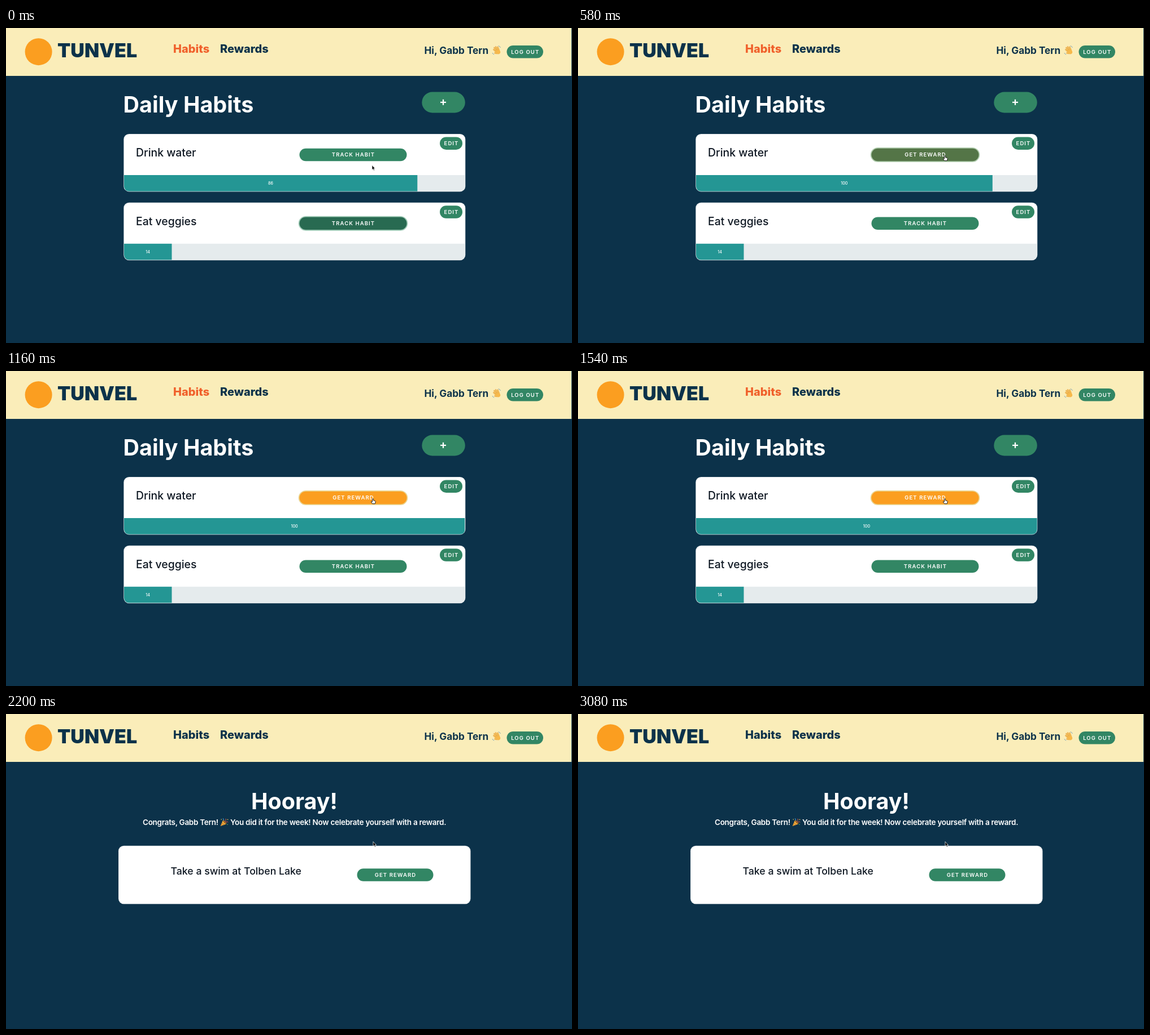
Animation, 1002 px wide and 559 px high, one loop 3100 ms. Source, as an HTML page:

```html
<!DOCTYPE html>
<html lang="en">
<head>
<meta charset="utf-8">
<title>Habit tracker</title>
<style>
  html, body { margin: 0; width: 100%; height: 100%; overflow: hidden; background: #0c324a; }
  svg { display: block; width: 100vw; height: 100vh; }
  text { font-family: Inter, "Open Sans", sans-serif; font-weight: 600; fill: #fff; white-space: pre; }
  .brand { font-size: 34px; font-weight: 900; fill: #0c324a; }
  .nav { font-size: 20px; font-weight: 800; fill: #0c324a; }
  .hello { font-size: 17.2px; font-weight: 700; fill: #0c324a; }
  .title { font-size: 39.5px; font-weight: 700; }
  .habit { font-size: 19.4px; font-weight: 550; fill: #0f1823; }
  .reward { font-size: 17.7px; font-weight: 550; fill: #0f1823; }
  .note { font-size: 13.5px; letter-spacing: -.28px; }
  .label { font-size: 9.5px; letter-spacing: 1.1px; text-anchor: middle; }
  .count { font-size: 7.2px; font-weight: 500; text-anchor: middle; }
  .middle { text-anchor: middle; }
</style>
</head>
<body>
<svg id="stage" viewBox="0 0 1002 559" preserveAspectRatio="none"></svg>
<script>
const LOOP = 3100;
const GREEN = [50, 134, 100], DARK = [40, 106, 81], ORANGE = [251, 158, 32];
const GREEN_RING = [164, 205, 186], GOLD_RING = [235, 213, 145], WHITE = [255, 255, 255];
const BAR_LEFT = 209, BAR_WIDTH = 603.8;
const rgb = c => `rgb(${c.map(Math.round)})`;

const text = (cls, x, y, value, id = '') =>
  `<text class="${cls}" x="${x}" y="${y}" id="${id}">${value}</text>`;

const button = (x, y, w, h, label, id = '') => `
  <rect id="${id}Box" x="${x}" y="${y}" width="${w}" height="${h}" rx="${h / 2}" fill="${rgb(GREEN)}"/>
  ${text('label', x + w / 2 + .5, y + h / 2 + 3.4, label, id + 'Label')}`;

const panel = (x, y, w, h) => `
  <rect x="${x}" y="${y}" width="${w}" height="${h}" rx="9.5" fill="#dfe3e6"/>
  <rect x="${x + .8}" y="${y + .8}" width="${w - 1.6}" height="${h - 1.6}" rx="8.7" fill="#fff"/>`;

const habitCard = (y, name, id) => `
  <clipPath id="${id}Clip"><rect x="209" y="${y}" width="603.8" height="101.8" rx="9"/></clipPath>
  ${panel(208.3, y, 605, 102.4)}
  <g clip-path="url(#${id}Clip)">
    <rect x="209" y="${y + 73}" width="604" height="29" fill="#e5ebed"/>
    <rect id="${id}Bar" x="209" y="${y + 73}" width="84.5" height="29" fill="#249694"/>
  </g>
  ${text('count', 251.2, y + 90, '14', id + 'Count')}
  ${text('habit', 230, y + 40, name)}
  ${button(519.5, y + 25.7, 190, 22.6, 'TRACK HABIT', id)}
  ${button(768, y + 5.5, 40, 22.4, 'EDIT')}`;

const FINGERS = 'M-3 1L-4.2-4.6M-1 0L-1.5-6.8M1.2 0L1.4-6.8M3.2 1L4.2-4.8M-2.6 4.4L-5.6 1.6';
const waveHand = `
  <g transform="translate(869.4 40) rotate(-32)" fill="none" stroke-linecap="round">
    <path d="${FINGERS}" stroke="#d98f34" stroke-width="2.3"/>
    <path d="${FINGERS}" stroke="#fac65a" stroke-width="1.5"/>
    <path d="M-3.7 .4Q0-1 4.1 .4V3Q3.7 7.2 .5 7.2Q-2 7.2-3.7 4Z" fill="#f7b94b"/>
  </g>
  <path d="M871.5 31.6Q874.6 32.2 875.4 35M861 44Q861.8 46.6 864.2 47" fill="none" stroke="#7da3b5" stroke-width=".9"/>`;

const popper = `
  <path d="M379.6 199L384 188.6L390.3 195Z" fill="#f5b53d"/>
  <path d="M382.3 193L386.2 197M381 196L383 198" stroke="#c9772c" stroke-width="1.2"/>
  <ellipse cx="387.2" cy="191.8" rx="1.6" ry="4.2" transform="rotate(-44 387.2 191.8)" fill="#9a6327"/>
  <path d="M387 191Q391 189 389 185.8M389 192Q391 190 393.4 192" fill="none" stroke="#e8584f"/>
  <path d="M385 189Q386 187 384.2 185.2" fill="none" stroke="#55a8e8"/>
  <g fill="#f4cf4d"><circle cx="381.2" cy="187" r=".8"/><circle cx="392.5" cy="187.4" r=".8"/></g>
  <circle cx="392" cy="196" r=".8" fill="#68bd68"/>`;

const stage = document.getElementById('stage');
stage.innerHTML = `
  <rect width="1002" height="559" fill="#0c324a"/>
  <rect width="1001" height="85" fill="#faedb9"/>
  <circle cx="57.6" cy="42.2" r="24" fill="#fb9e20"/>
  ${text('brand', 91, 51.8, 'TUNVEL')}
  ${text('nav', 296, 44, 'Habits', 'habitsLink')}
  ${text('nav', 379, 44, 'Rewards')}
  ${text('hello', 740.5, 45.5, 'Hi, Gabb Tern')}
  ${waveHand}
  ${button(886.5, 31, 64.5, 22.5, 'LOG OUT')}
  <g id="habitsPage">
    ${text('title', 207.5, 150, 'Daily Habits')}
    <rect x="736.3" y="113.5" width="76.5" height="37" rx="18.5" fill="${rgb(GREEN)}"/>
    <path d="M769 131.8H779M774 126.8V136.8" stroke="#fff" stroke-width="2.3"/>
    ${habitCard(188, 'Drink water', 'water')}
    ${habitCard(309.8, 'Eat veggies', 'veggies')}
  </g>
  <g id="rewardPage">
    ${text('title middle', 510.5, 169, 'Hooray!')}
    ${text('note', 242, 196.5, 'Congrats, Gabb Tern!')}
    ${popper}
    ${text('note', 397, 196.5, 'You did it for the week! Now celebrate yourself with a reward.')}
    ${panel(199, 233.7, 623.5, 103.6)}
    ${text('reward', 291.5, 285.3, 'Take a swim at Tolben Lake')}
    ${button(621.5, 274.2, 135, 22.6, 'GET REWARD')}
  </g>
  <g id="cursor" stroke="#fff" stroke-linejoin="round">
    <path id="arrow" d="M0 0V8.2L1.8 6.6L3 9.4L4.4 8.8L3.2 6.1H5.6Z" fill="#000" stroke-width=".7"/>
    <path id="hand" d="M-1.4 .4Q-.5-.9.4.4V3.2L3.6 4Q4.4 4.3 4.2 5.4L3.3 9H-1.2L-3.8 5.6Q-3.6 4.4-1.4 5.6Z"
      fill="#fff" stroke="#111" stroke-width=".9"/>
  </g>`;

const el = id => document.getElementById(id);
const show = (id, visible) => el(id).setAttribute('display', visible ? 'inline' : 'none');
const clamp = v => Math.min(1, Math.max(0, v));
const mix = (a, b, k) => a.map((v, i) => v + (b[i] - v) * k);

// CSS-style cubic-bezier timing, solved by bisection.
function bezier(x1, y1, x2, y2) {
  const at = (a, b, s) => 3 * a * s * (1 - s) ** 2 + 3 * b * s * s * (1 - s) + s ** 3;
  return x => {
    if (x <= 0 || x >= 1) return clamp(x);
    let low = 0, high = 1;
    for (let i = 0; i < 24; i++) {
      const mid = (low + high) / 2;
      if (at(x1, x2, mid) < x) low = mid; else high = mid;
    }
    return at(y1, y2, low);
  };
}
const ease = bezier(.25, .1, .25, 1), easeInOut = bezier(.42, 0, .58, 1);
const fade = (t, start) => easeInOut(clamp((t - start) / 180));

function paintButton(id, fill, ring, ringAmount) {
  const box = el(id + 'Box');
  box.setAttribute('fill', rgb(fill));
  box.setAttribute('stroke', rgb(mix(WHITE, ring, ringAmount)));
  box.setAttribute('stroke-width', 3.6 * ringAmount);
  box.setAttribute('paint-order', 'stroke');
}

function draw(t) {
  const HOVER = 160, PRESS = 400, TRACKED = 524, IDLE = 1800, PAGE = 2040;
  const tracked = t >= TRACKED, rewarded = t >= PAGE;
  show('habitsPage', !rewarded);
  show('rewardPage', rewarded);
  el('habitsLink').style.fill = rewarded ? '#0c324a' : '#f0602b';

  const width = BAR_WIDTH * (.86 + .14 * ease(clamp((t - TRACKED) / 720)));
  el('waterBar').setAttribute('width', width);
  el('waterCount').setAttribute('x', BAR_LEFT + width / 2);
  el('waterCount').textContent = tracked ? '100' : '86';
  el('waterLabel').textContent = tracked ? 'GET REWARD' : 'TRACK HABIT';

  const gold = fade(t, TRACKED), focus = fade(t, PRESS);
  paintButton('water', mix(mix(GREEN, DARK, fade(t, HOVER)), ORANGE, gold), mix(GREEN_RING, GOLD_RING, gold), focus);
  paintButton('veggies', mix(DARK, GREEN, focus), GREEN_RING, 1 - focus);

  const move = easeInOut(clamp(t / 300));
  el('cursor').setAttribute('transform', `translate(${648 + 2 * move} ${243.5 - 17 * move})`);
  const pointing = t >= HOVER && t < IDLE;
  show('hand', pointing);
  show('arrow', !pointing);
}

function tick() {
  draw(performance.now() % LOOP);
  requestAnimationFrame(tick);
}
tick();
</script>
</body>
</html>
```
